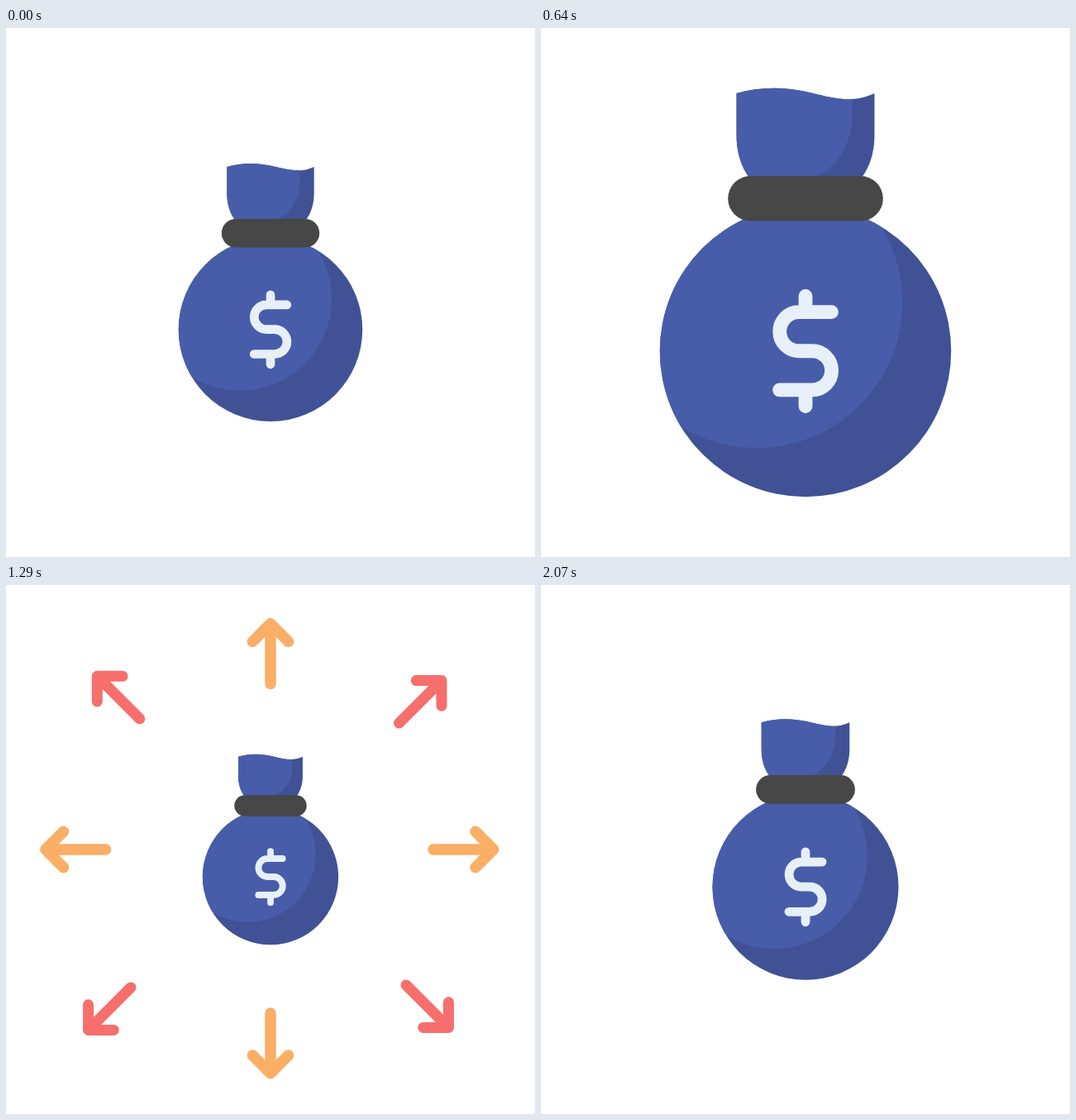
An HTML page with a canvas for the animation above (2140 ms loop, 640 by 640 pixels).

```html
<!DOCTYPE html>
<html lang="en">
<head>
<meta charset="utf-8">
<title>Money bag</title>
<style>
  html, body { margin: 0; width: 100%; height: 100%; overflow: hidden; background: #fff; }
  canvas { display: block; width: 640px; height: 640px; }
</style>
</head>
<body>
<canvas id="stage" width="640" height="640"></canvas>
<script>
const ctx = document.getElementById('stage').getContext('2d');
const LOOP = 2140, STEPS = 30;
const BLUE = '#485da9', SHADE = '#405295', BAND = '#474747', PALE = '#e7f0f9';
const ORANGE = '#fa8a20', PINK = '#f66f6c';

// Bag scale keys: [step, scale, easing handles towards the next key]
const KEYS = [
  [0, 0.631, 0.57, 0.667],
  [8.36, 1.028, 0.333, 0.667],
  [13.7, 0.312, 0.333, 0.667],
  [25, 0.787, 0.333, 0.43],
  [30, 0.631]
];

// Arrow centres at step 15, relative to the middle, with their heading
const STRAIGHT = [
  [0, -159.75, 0], [156.25, 0, 90], [0, 157.25, 180], [-158.75, 0, 270]
];
const DIAGONAL = [
  [-125.5, -125.5, -45], [122.75, -120.25, 45], [131.25, 131.25, 135], [-136.25, 134.25, 225]
];

const neck = new Path2D(
  'M236.5 79C265 71 295 70.5 327 78.5C355 85.5 378 91 403.5 79V130' +
  'C403.5 150 398 168 388 181L380 200H260L252 181C242 168 236.5 150 236.5 130Z');
const neckLight = new Path2D('M230 60H376.5V105C376.5 140 358 170 330 181L320 200H230Z');
const dollar = new Path2D(
  'M351.5 343.6H312.3A23.6 23.6 0 0 0 312.3 390.8H328A23.6 23.6 0 0 1 328 438H288.6' +
  'M320 324.4V343.6M320 437.6V457.6');
const arrow = new Path2D('M0 36.4V-36.4M-21.7 -14.7L0 -36.4L21.7 -14.7');
const body = disc(320, 391);
const bodyLight = disc(261, 332);

function disc(x, y) {
  const p = new Path2D();
  p.arc(x, y, 176.3, 0, Math.PI * 2);
  return p;
}

function ease(u, x1, x2) {
  let lo = 0, hi = 1, s = u;
  for (let i = 0; i < 24; i++) {
    s = (lo + hi) / 2;
    const x = 3 * x1 * s * (1 - s) ** 2 + 3 * x2 * s * s * (1 - s) + s ** 3;
    if (x < u) lo = s; else hi = s;
  }
  return s * s * (3 - 2 * s);
}

function bagScale(t) {
  let k = 0;
  while (k < KEYS.length - 2 && t >= KEYS[k + 1][0]) k++;
  const [t0, a, x1, x2] = KEYS[k], [t1, b] = KEYS[k + 1];
  return a + (b - a) * ease((t - t0) / (t1 - t0), x1, x2);
}

function shaded(shape, light) {
  ctx.fillStyle = SHADE;
  ctx.fill(shape);
  ctx.save();
  ctx.clip(shape);
  ctx.fillStyle = BLUE;
  ctx.fill(light);
  ctx.restore();
}

function drawBag(t) {
  const s = bagScale(t);
  ctx.save();
  ctx.translate(320, 320);
  ctx.scale(s, s);
  ctx.translate(-320, -320);
  shaded(neck, neckLight);
  shaded(body, bodyLight);
  ctx.lineCap = 'round';
  ctx.lineWidth = 54.5;
  ctx.strokeStyle = BAND;
  ctx.beginPath();
  ctx.moveTo(253.4, 206.3);
  ctx.lineTo(386.6, 206.3);
  ctx.stroke();
  ctx.lineWidth = 16.8;
  ctx.strokeStyle = PALE;
  ctx.stroke(dollar);
  ctx.restore();
}

// Arrows slow down on the way out, then fade over five steps
function drawArrows(t, list, color, width, speed, drag, fadeStart) {
  const alpha = Math.min(1, 1 - (t - fadeStart) / 5);
  if (t < 10.5 || alpha <= 0) return;
  const d = t - 15, shift = speed * d - drag * d * d;
  ctx.globalAlpha = alpha;
  ctx.strokeStyle = color;
  ctx.lineWidth = width;
  ctx.lineCap = ctx.lineJoin = 'round';
  for (const [x, y, deg] of list) {
    ctx.save();
    ctx.translate(320 + x + Math.sign(x) * shift, 320 + y + Math.sign(y) * shift);
    ctx.rotate(deg * Math.PI / 180);
    ctx.stroke(arrow);
    ctx.restore();
  }
  ctx.globalAlpha = 1;
}

function draw(ms) {
  const t = Math.min(STEPS - 1, Math.floor((ms + 5) * STEPS / LOOP));
  ctx.fillStyle = '#fff';
  ctx.fillRect(0, 0, 640, 640);
  drawArrows(t, DIAGONAL, PINK, 13, 21.87, 0.795, 19.35);
  drawArrows(t, STRAIGHT, ORANGE, 13.4, 30.67, 1.665, 16.45);
  drawBag(t);
}

let start;
function tick(now) {
  if (start === undefined) start = now;
  draw((now - start) % LOOP);
  requestAnimationFrame(tick);
}
draw(0);
requestAnimationFrame(tick);
</script>
</body>
</html>
```
